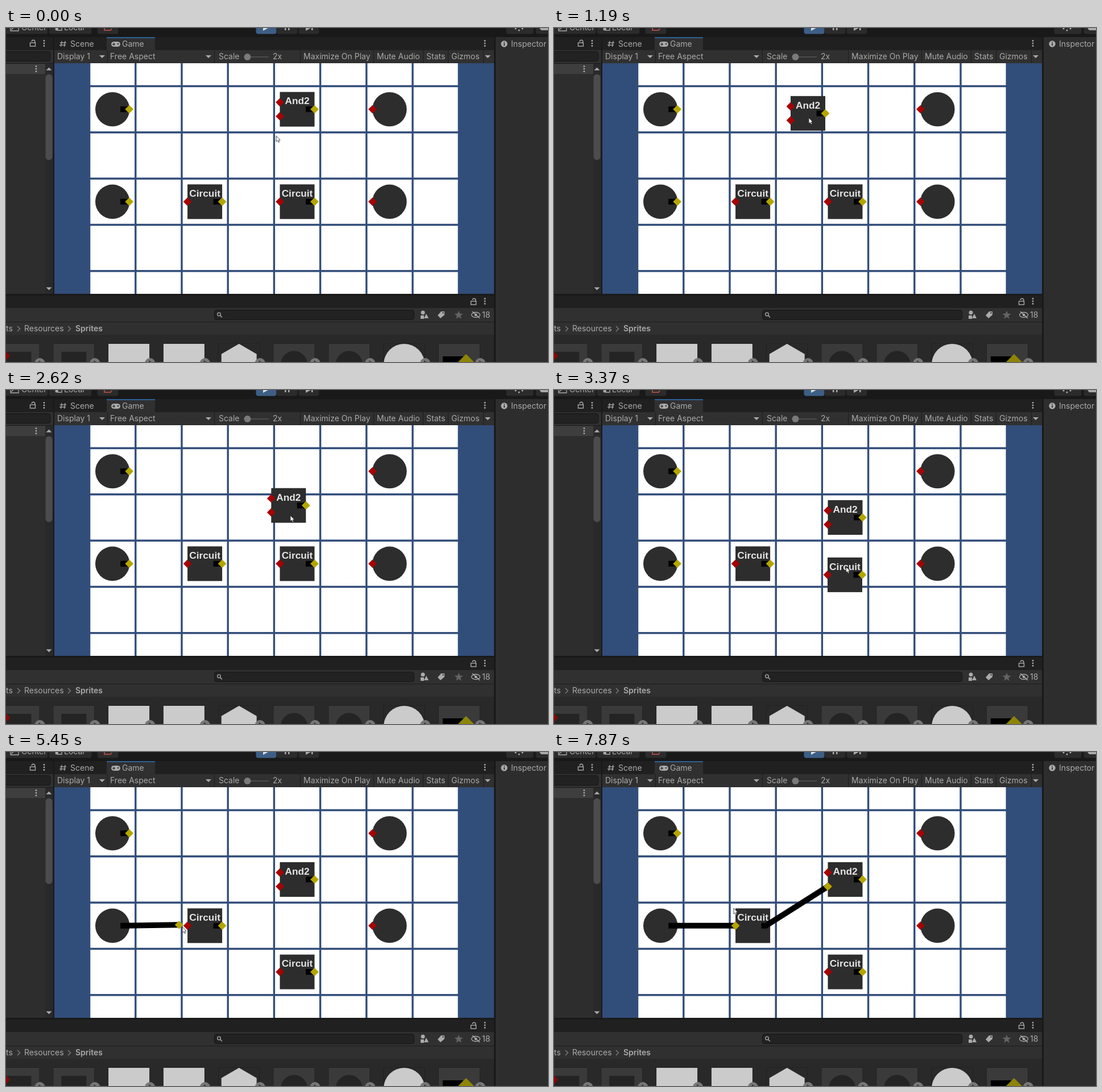
Animation of 953 by 588 pixels, one loop 7990 ms. Source, as an HTML page with a canvas:

```html
<!DOCTYPE html>
<html lang="en">
<head>
<meta charset="utf-8">
<title>Logic board editor</title>
<style>
html, body { margin: 0; width: 100%; height: 100%; overflow: hidden; background: #191919; }
canvas { display: block; }
</style>
</head>
<body>
<canvas id="stage" width="953" height="588"></canvas>
<script>
const c = document.getElementById('stage').getContext('2d');
const LOOP = 7990;
const PANEL = '#2d2d2d', BAR = '#303030', STRIP = '#202020', EDGE = '#191919', LINE = '#1d1d1d', TEXT = '#aaa';
const RED = '#a60303', YELLOW = '#b3a600', LIGHT = '#cbcbcb';

// Pointer key points: [time, x, y]
const path = [[0, 475, 190], [320, 517, 153], [470, 513.5, 151], [710, 498, 172], [1190, 448, 158],
  [1550, 452, 232], [1830, 464, 262], [2230, 434, 161], [2620, 500, 221], [3250, 514, 292],
  [3720, 512, 368], [3870, 480, 370], [4350, 237, 310], [4490, 222.5, 309.5], [5450, 310, 308],
  [6310, 370, 307], [6670, 383, 307], [7330, 482, 235], [7870, 316, 275]];

function pointer(t) {
  const i = path.findIndex(p => p[0] > t);
  if (i < 0) return path[path.length - 1].slice(1);
  const [t0, x0, y0] = path[i - 1], [t1, x1, y1] = path[i];
  const k = (t - t0) / (t1 - t0);
  return [x0 + (x1 - x0) * k, y0 + (y1 - y0) * k];
}

// Follows the pointer between grab and drop, then snaps to its new place
function drag(t, from, to, grab, drop) {
  if (t < grab) return from;
  if (t >= drop) return to;
  const p = pointer(t), g = pointer(grab);
  return [from[0] + p[0] - g[0], from[1] + p[1] - g[1]];
}

const cell = (i, j) => [187.2 + 81.2 * i, 143.1 + 81.35 * j];
const shift = ([x, y], dx, dy = 0) => [x + dx, y + dy];

function rect(x, y, w, h, color) {
  c.fillStyle = color;
  c.fillRect(x, y, w, h);
}

function disc(x, y, r, color) {
  c.fillStyle = color;
  c.beginPath();
  c.arc(x, y, r, 0, 7);
  c.fill();
}

function ring(x, y, rx, ry = rx) {
  c.strokeStyle = TEXT;
  c.lineWidth = 1.3;
  c.beginPath();
  c.ellipse(x, y, rx, ry, 0, 0, 7);
  c.stroke();
}

function poly(color, ...pts) {
  c.fillStyle = color;
  c.beginPath();
  pts.forEach(p => c.lineTo(...p));
  c.closePath();
  c.fill();
}

function line(color, width, ...pts) {
  c.strokeStyle = color;
  c.lineWidth = width;
  c.beginPath();
  pts.forEach(p => c.lineTo(...p));
  c.stroke();
}

function round(x, y, w, h, r, fill, stroke = fill) {
  c.beginPath();
  c.roundRect(x, y, w, h, r);
  c.fillStyle = fill;
  c.fill();
  c.strokeStyle = stroke;
  c.lineWidth = 1;
  c.stroke();
}

function text(s, x, y, weight = 400) {
  c.font = weight + ' 14px Inter, sans-serif';
  c.textAlign = 'left';
  c.fillStyle = TEXT;
  c.fillText(s, x, y);
}

const diamond = (x, y, color, r = 7.4) => poly(color, [x - r, y], [x, y - r], [x + r, y], [x, y + r]);
const arrow = (x, y, d = 1) => poly(TEXT, [x - 5, y - 2.5 * d], [x + 5, y - 2.5 * d], [x, y + 2.5 * d]);
const play = (x, y, color) => poly(color, [x, y - 6], [x + 9, y], [x, y + 5]);
const kebab = (x, y) => [-4.5, 0, 4.5].forEach(d => disc(x, y + d, 1.4, TEXT));
const field = (x, y, w) => round(x, y, w, 17, 4, '#222', '#151515');

function lock(x, y) {
  c.strokeStyle = TEXT;
  c.lineWidth = 1.4;
  c.strokeRect(x - 4.5, y - 1, 9, 6);
  c.beginPath();
  c.arc(x + 1, y - 3, 2.8, Math.PI, 0);
  c.lineTo(x + 3.8, y - 1);
  c.stroke();
}

function topBar() {
  const button = (x, w, color = '#2b2b2b') => round(x, -10, w, 20, 3, color);
  button(-5, 78);
  button(76, 74);
  button(161, 36);
  button(440, 35, '#3d5f86');
  button(476, 36);
  button(515, 35);
  button(880, 47);
  button(932, 30);
  text('Center', 27, 4);
  text('Local', 102, 4);
  line(TEXT, 1.3, [8, -2], [8, 5], [22, 5], [22, -2]);
  line(TEXT, 1.3, [9, 3], [14, -1], [20, -4]);
  line(TEXT, 1.3, [91, -1], [91, 4], [98, 4], [98, -1]);
  disc(89, 2, 2.5, TEXT);
  line('#a34b40', 2, [173, 0], [173, 4], [184, 4], [186, 1]);
  play(452, 0, '#ddd');
  play(527, 0, TEXT);
  [490, 496, 537].forEach(x => rect(x, -5, 2.5, 9, TEXT));
  [-6, 0, 6].forEach(d => disc(902 + d, 4 - Math.abs(d) / 2, 1.5, TEXT));
  poly(TEXT, [938, 0], [953, 0], [953, 4], [941, 4]);
}

function leftPanel() {
  rect(0, 16, 83, 452, PANEL);
  rect(0, 16, 83, 23, STRIP);
  rect(0, 39, 83, 23, BAR);
  lock(47, 27);
  kebab(67, 27);
  field(-9, 41.5, 87);
  rect(0, 62, 83, 1, EDGE);
  rect(0, 63, 69, 18, '#3e3e3e');
  kebab(53, 72);
  rect(69, 63, 14, 405, '#292929');
  arrow(75.5, 72, -1);
  arrow(75.5, 459);
  round(70, 82, 11, 150, 5, '#4c4c4c');
}

function gameBar() {
  rect(85, 16, 773, 23, STRIP);
  rect(85, 39, 773, 23, BAR);
  rect(177, 16, 85, 23, BAR);
  rect(177, 16, 85, 2, '#2e6096');
  for (const d of [0, 1]) {
    line(TEXT, 1.3, [98 + 6 * d, 23], [96.5 + 6 * d, 33]);
    line(TEXT, 1.3, [95 - d, 26 + 4 * d], [106 - d, 26 + 4 * d]);
  }
  round(185.5, 24.5, 15, 8, 4, TEXT);
  rect(187, 28, 5, 1.3, BAR);
  rect(189, 26, 1.3, 5, BAR);
  disc(197, 28, 1.3, BAR);
  text('Scene', 113, 33);
  text('Game', 204, 33);
  kebab(842, 27);

  // Each label ends with a divider
  const label = (s, x, end) => {
    text(s, x, 55);
    rect(end, 39, 1, 23, LINE);
  };
  label('Display 1', 90, 178);
  label('Free Aspect', 183, 366);
  label('Scale', 374, 517);
  label('2x', 469, 517);
  label('Maximize On Play', 523, 646);
  label('Mute Audio', 652, 733);
  label('Stats', 739, 777);
  label('Gizmos', 783, 839);
  [169, 356, 847].forEach(x => arrow(x, 50.5));
  rect(424, 50, 38, 2, '#4b4b4b');
  disc(424.5, 51, 6, '#7a7a7a');
}

function inspector() {
  rect(861, 16, 92, 572, PANEL);
  disc(876, 28, 5.7, TEXT);
  rect(875.2, 27, 1.8, 4, PANEL);
  rect(875.2, 24.3, 1.8, 1.6, PANEL);
  text('Inspector', 888, 33);
}

function thumbs() {
  const icons = [
    m => { rect(m - 22, 570, 44, 20, '#242424'); diamond(m - 22, 577, '#850808', 7); },
    m => rect(m - 22, 570, 44, 20, '#242424'),
    m => rect(m - 36, 556, 72, 40, LIGHT),
    m => rect(m - 36, 556, 72, 40, LIGHT),
    m => poly(LIGHT, [m - 31, 574], [m, 556], [m + 31, 574], [m + 31, 590], [m - 31, 590]),
    m => disc(m, 592, 23.5, '#242424'),
    m => disc(m, 592, 23.5, '#242424'),
    m => disc(m, 592, 36, LIGHT),
    m => { rect(m - 29, 578, 36, 12, '#000'); diamond(m + 12, 592, '#8e8407', 18); },
  ];
  icons.forEach((icon, i) => {
    const m = 22.5 + 96.8 * i;
    rect(m - 36.5, 555.5, 73, 40, LINE);
    rect(m - 36, 556, 72, 40, i == 4 || i == 7 ? '#292929' : '#3a3a3a');
    icon(m);
    disc(m + 37, 590, 9, '#777');
    poly('#333', [m + 35, 585], [m + 41, 589], [m + 35, 590]);
  });
}

function project() {
  rect(0, 471, 858, 22, STRIP);
  rect(0, 493, 858, 48, BAR);
  rect(0, 517, 858, 1, LINE);
  rect(0, 540, 858, 48, '#292929');
  lock(822, 482);
  kebab(842, 481);
  field(366.5, 496.5, 351);
  ring(374.5, 504, 2.8);
  line(TEXT, 1.5, [376.5, 506], [380, 509.5]);
  disc(733, 501, 3.5, TEXT);
  rect(729, 506, 6, 6, TEXT);
  poly(TEXT, [735, 511], [739, 503], [743, 511]);
  poly(TEXT, [759, 506], [765, 499], [771, 499], [771, 505], [764, 511]);
  disc(768.5, 501.5, 1.2, BAR);
  poly('#646464', ...Array.from({ length: 10 }, (_, i) => {
    const r = i % 2 ? 3.3 : 8, a = i * Math.PI / 5;
    return [796 + r * Math.sin(a), 505.5 - r * Math.cos(a)];
  }));
  ring(826, 505, 7.5, 4.5);
  disc(826, 505, 2.3, TEXT);
  line(TEXT, 1.5, [820, 499], [833, 511]);
  text('18', 837, 510);
  text('ts', 0, 534);
  text('Resources', 32, 534);
  text('Sprites', 122, 534, 600);
  [20, 109].forEach(x => line('#808080', 1.4, [x, 525], [x + 4.5, 529.5], [x, 534]));
  thumbs();
}

function board() {
  c.save();
  c.beginPath();
  c.rect(85, 62, 773, 406);
  c.clip();
  rect(85, 62, 773, 406, '#314d79');
  for (let i = 0; i < 8; i++) for (let j = -1; j < 5; j++) {
    const [x, y] = cell(i, j);
    rect(x - 38.9, y - 38.9, 77.8, 77.8, '#fff');
  }
  c.restore();
}

// The stub stays inside its part; the wire bends from its middle
function output([x, y], tip) {
  if (tip) line('#000', 10, [x - 15.5, y], [x - 7.5, y], tip);
  else rect(x - 15.5, y - 5, 15.5, 10, '#000');
  diamond(...(tip || [x, y]), YELLOW);
}

function chip([x, y], name, inputs) {
  rect(x - 30.5, y - 30.5, 61, 61, PANEL);
  c.font = 'bold 17.3px "Liberation Sans", Arial, sans-serif';
  c.textAlign = 'center';
  c.fillStyle = '#e4e4e4';
  c.fillText(name, x, y - 8.7);
  inputs.forEach(d => diamond(x - 30.5, y + d, RED));
}

function cursor([x, y]) {
  const shape = [[0, 0], [0, 10], [2.3, 8], [4, 11.5], [5.6, 10.8], [4.2, 7.4], [7, 7.2]].map(p => shift(p, x, y));
  poly('#fff', ...shape);
  line('#222', 0.8, ...shape, shape[0]);
}

function scene(t) {
  const first = cell(3, 0), second = cell(4, 1), upper = cell(2, 2);
  const and = t < 2230 ? drag(t, cell(4, 0), first, 470, 1310) : drag(t, first, second, 2230, 2860);
  const lower = drag(t, cell(4, 2), cell(4, 3), 3250, 3750);
  const source = shift(cell(0, 2), 29.5), relay = shift(upper, 30.5);

  board();
  for (const j of [0, 2]) {
    const [x, y] = cell(6, j);
    disc(...cell(0, j), 30.2, PANEL);
    disc(x, y, 30.2, PANEL);
    diamond(x - 30, y, RED);
  }
  chip(upper, 'Circuit', [0]);
  chip(lower, 'Circuit', [0]);
  chip(and, 'And2', [-12.3, 12.3]);

  output(shift(cell(0, 0), 29.5));
  output(shift(lower, 30.5));
  output(shift(and, 30.5));
  output(relay, t >= 6670 && drag(t, relay, shift(second, -30.5, 12.3), 6670, 7330));
  output(source, t >= 4490 && drag(t, source, shift(upper, -30.5), 4490, 5590));
  cursor(pointer(t));
}

function draw(now) {
  rect(0, 0, 953, 588, EDGE);
  topBar();
  leftPanel();
  gameBar();
  inspector();
  project();
  scene(now % LOOP);
  requestAnimationFrame(draw);
}
requestAnimationFrame(draw);
</script>
</body>
</html>
```
